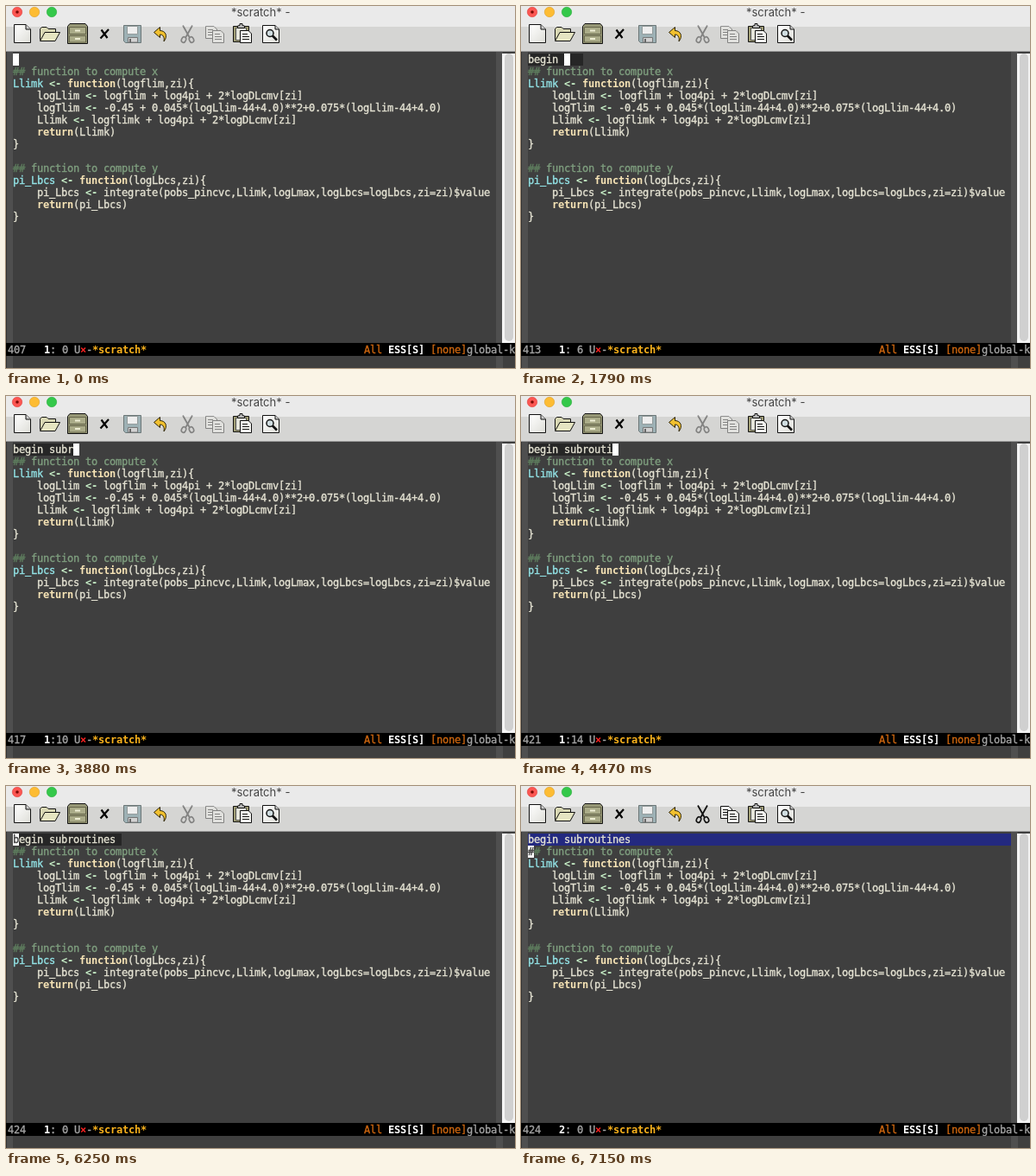
An HTML page that plays this animation: 590 by 419 pixels, repeating every 8000 ms.

```html
<!DOCTYPE html>
<html lang="en">
<head>
<meta charset="utf-8">
<title>Editor</title>
<style>
html, body { margin: 0; width: 590px; height: 419px; overflow: hidden; background: #3f3f3f; }
body { position: relative; }
body > * { position: absolute; margin: 0; }
pre, #cursor { font: 12px/14px "DejaVu Sans Mono", monospace; letter-spacing: calc(7px - 1ch); color: #e5e3d3; white-space: pre; -webkit-text-stroke: .35px; }
b { font-weight: bold; -webkit-text-stroke: 0; }
.fringe { box-sizing: border-box; width: 8px; top: 53px; height: 366px; background: #4f4f4f; }
#scroll { left: 575px; top: 55px; width: 15px; height: 335px; background: #f4f4f4; }
#scroll i { position: absolute; left: 3px; width: 10px; height: 333px; border-radius: 5px; background: #d0d0d0; }
#shade { left: 8px; top: 55px; height: 14px; }
#text { left: 8px; top: 55px; }
#cursor { width: 7px; height: 14px; background: #fff; color: #3f3f3f; }
#mode { left: 0; top: 390px; width: 588px; height: 14px; padding: 1px 0 0 2px; background: #000; color: #a3a3a3; overflow: hidden; }
#echo { left: 8px; top: 405px; }
.note { color: #7f9f7f; }
.mark { color: #5f7f5f; }
.name { color: #93e4e7; }
.key { color: #f7e4b6; }
.op { color: #c6eec6; }
.white { color: #fff; }
.orange { color: #cb650f; }
.gold { color: #fab31c; }
.red { color: #f22; }
</style>
</head>
<body>
<svg width="590" height="53" fill="none" stroke="#111" stroke-linejoin="round">
  <defs>
    <linearGradient id="paper" x2="1" y2="1"><stop stop-color="#fff"/><stop offset="1" stop-color="#deded8"/></linearGradient>
  </defs>
  <path d="M0 0H590V24H0Z" fill="#eaeaea" stroke="none"/>
  <path d="M0 24H590V53H0Z" fill="#d5d5d3" stroke="none"/>
  <path d="M0 52.5H590" stroke="#999"/>
  <g stroke-width=".6">
    <circle cx="13" cy="7" r="5.7" fill="#fc5652" stroke="#dc3e39"/>
    <circle cx="33" cy="7" r="5.7" fill="#fdbc33" stroke="#dc9d22"/>
    <circle cx="53" cy="7" r="5.7" fill="#34c84a" stroke="#22a934"/>
  </g>
  <circle cx="13" cy="7" r="1.8" fill="#7c0a05" stroke="none"/>
  <text x="261" y="12" font-family="Inter, sans-serif" font-size="13" fill="#444" stroke="none">*scratch* -</text>
  <!-- new, open, folder view, close -->
  <path d="M9.5 21.5H23L28.5 27V42.5H9.5Z" fill="url(#paper)"/>
  <path d="M23 21.5V27H28.5" fill="#ccc"/>
  <path d="M39.5 39.5V26.5L41.5 24.5H47L49 26.5H57.5V30" fill="#d9d8b4"/>
  <path d="M39.5 40.5L45 30.5H62.5L57 40.5Z" fill="#e6e5c2"/>
  <path d="M71.5 23.5L74 20.5H92L94.5 23.5V43.5H71.5Z" fill="#979877"/>
  <path d="M73.5 24.5H92.5V32.5H73.5ZM73.5 34.5H92.5V42H73.5Z" fill="#aaab88" stroke="#66664a"/>
  <path d="M80 28.5H86M80 38H86" stroke="#eeeed4" stroke-width="2"/>
  <path d="M110.5 27.5L117.5 37M119 27L109.5 37.5" stroke="#000" stroke-width="2.2"/>
  <!-- save, undo -->
  <path d="M136.5 22.5H156.5V42.5H138.5L136.5 40.5Z" fill="#9db1b5" stroke="#6b7676"/>
  <path d="M140.5 23.5H152.5V32.5H140.5Z" fill="#eee" stroke="#949c9c"/>
  <path d="M141.5 36.5H152.5V42H141.5Z" fill="#d2d2d2" stroke="#777"/>
  <path d="M144 38V42" stroke="#666" stroke-width="2"/>
  <path d="M171.5 30.5L178.5 24.5V28.5C185 28.5 188 35 183 41C184 36 182 33 178.5 33V36.5Z" fill="#f2c02f" stroke="#2b2309"/>
  <!-- cut, copy -->
  <g class="edit">
    <path d="M205 22.5L212.5 36M216 22.5L208.5 36" stroke-width="1.8"/>
    <ellipse cx="206" cy="39" rx="2.5" ry="3.4" transform="rotate(25 206 39)" stroke-width="1.6"/>
    <ellipse cx="215" cy="39" rx="2.5" ry="3.4" transform="rotate(-25 215 39)" stroke-width="1.6"/>
  </g>
  <g class="edit">
    <path d="M231.5 23.5H241L244.5 27V37.5H231.5Z" fill="#f3f3ef"/>
    <path d="M234 27.5H240M234 30.5H242M234 33.5H242"/>
    <path d="M239.5 28.5H249L252.5 32V42.5H239.5Z" fill="#f3f3ef"/>
    <path d="M242 32.5H248M242 35.5H250M242 38.5H250"/>
  </g>
  <!-- paste, search -->
  <path d="M263.5 23.5H281.5V41.5H263.5Z" fill="#a09d74"/>
  <path d="M266.5 25.5H278.5V39.5H266.5Z" fill="#e6e6dc" stroke="#555"/>
  <path d="M268.5 25.5V23L271 22.5V20.5H274V22.5L276.5 23V25.5Z" fill="#bbb"/>
  <path d="M271.5 28.5H281L284.5 32V42.5H271.5Z" fill="#f3f3ef"/>
  <path d="M274 32.5H280M274 35.5H282M274 38.5H282"/>
  <path d="M297.5 22.5H312L316.5 27V42.5H297.5Z" fill="url(#paper)"/>
  <path d="M312 22.5V27H316.5" fill="#ccc"/>
  <path d="M308.5 34L314 39.5" stroke-width="2.6"/>
  <circle cx="306" cy="31.5" r="4" fill="#d0dde0" stroke-width="1.5"/>
</svg>
<div class="fringe" style="left:0; border-left:1px solid #333"></div>
<div class="fringe" style="left:568px"></div>
<div id="scroll"><i></i></div>
<div id="shade"></div>
<pre id="text"><span id="typed"></span>
<span class="mark">## </span><span class="note">function to compute x</span>
<span class="name">Llimk</span> <b class="op">&lt;-</b> <b class="key">function</b>(logflim,zi){
    logLlim <b class="op">&lt;-</b> logflim + log4pi + 2*logDLcmv[zi]
    logTlim <b class="op">&lt;-</b> -0.45 + 0.045*(logLlim-44+4.0)**2+0.075*(logLlim-44+4.0)
    Llimk <b class="op">&lt;-</b> logflimk + log4pi + 2*logDLcmv[zi]
    <b class="key">return</b>(Llimk)
}

<span class="mark">## </span><span class="note">function to compute y</span>
<span class="name">pi_Lbcs</span> <b class="op">&lt;-</b> <b class="key">function</b>(logLbcs,zi){
    pi_Lbcs <b class="op">&lt;-</b> integrate(pobs_pincvc,Llimk,logLmax,logLbcs=logLbcs,zi=zi)$value
    <b class="key">return</b>(pi_Lbcs)
}</pre>
<div id="cursor"></div>
<pre id="mode"><span id="size"></span>   <b id="row" class="white"></b>:<span id="col"></span> U<b class="red">×</b>-<b class="gold">*scratch*</b>                                    <span class="orange">All</span> <b class="white">ESS[S]</b> <span class="orange">[none]</span>global-k</pre>
<pre id="echo"></pre>
<script>
const $ = id => document.getElementById(id);
const LINE = "begin subroutines", LOOP = 8000;
const KEYS = [300, 450, 750, 900, 1190, 1790, 2840, 2990, 3140, 3880,
  4030, 4180, 4330, 4470, 4770, 4910, 5060];
const HOME = 6250, MARK = 6850, DOWN = 7150;
const icons = document.querySelectorAll(".edit");

function draw(t) {
  const count = KEYS.filter(k => t >= k).length;
  const col = t < HOME ? count : 0;
  const row = t < DOWN ? 0 : 1;

  $("typed").textContent = LINE.slice(0, count);
  $("cursor").style.left = 8 + 7 * col + "px";
  $("cursor").style.top = 55 + 14 * row + "px";
  $("cursor").textContent = row ? "#" : LINE.slice(0, count)[col] || "";

  $("shade").style.width = (row ? 560 : count ? Math.max(64, 7 * count + 7) : 0) + "px";
  $("shade").style.background = row ? "#232980" : "#262626";

  $("size").textContent = 407 + count;
  $("row").textContent = row + 1;
  $("col").textContent = String(col).padStart(2);
  $("echo").textContent = t >= MARK && t < DOWN ? "Mark set" : "";
  for (const icon of icons) icon.style.opacity = t < MARK ? 0.42 : 1;
}

const start = performance.now();
function tick() {
  draw((performance.now() - start) % LOOP);
  requestAnimationFrame(tick);
}
tick();
</script>
</body>
</html>
```
